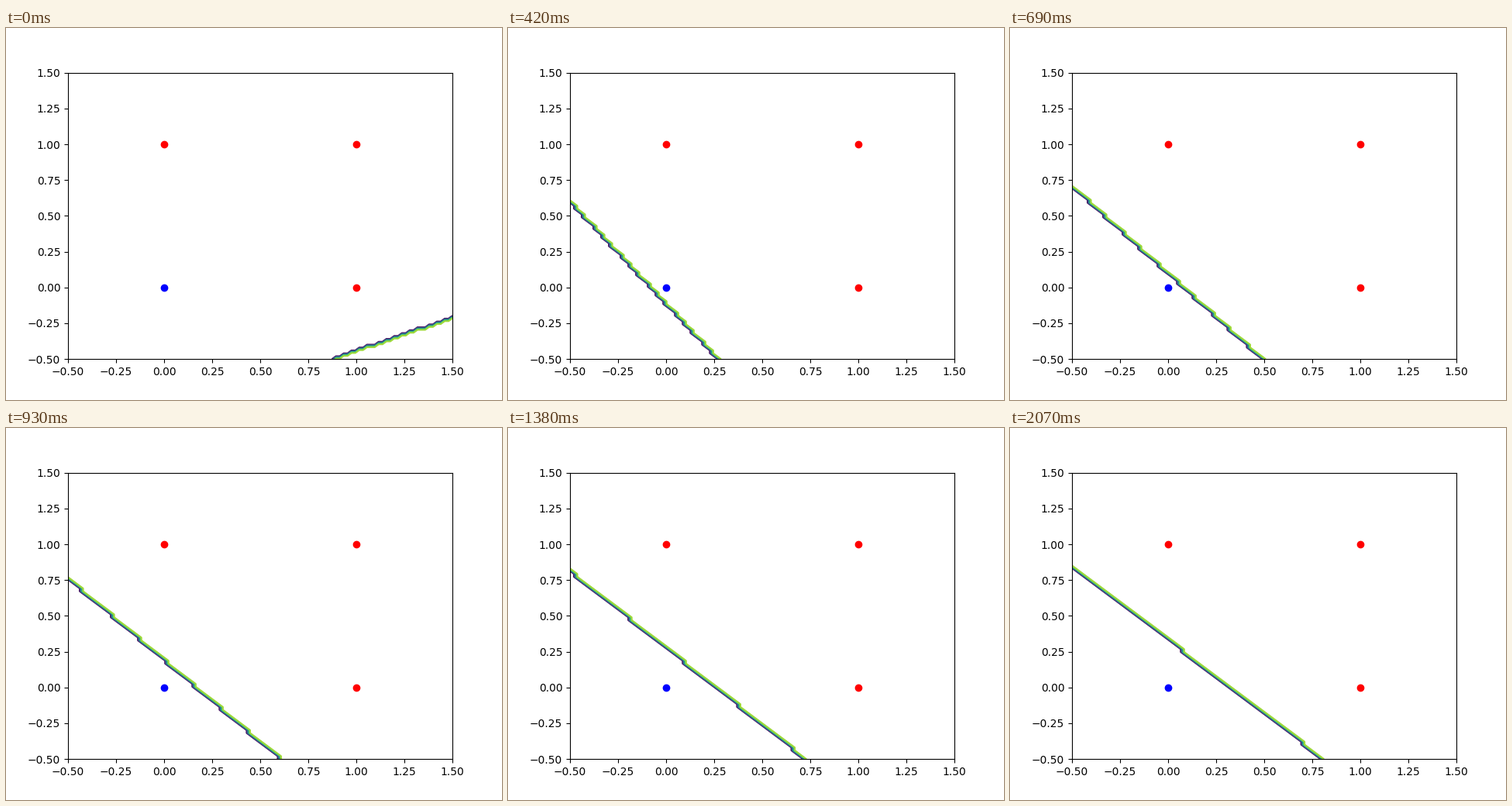
Write a matplotlib script that moves like this. It is 640 px wide and 480 px high and loops after 2100 ms.

```python
import numpy as np
import matplotlib.pyplot as plt
from matplotlib.animation import FuncAnimation

FRAMES = 70
RATE = 1.0

# Logistic regression on the OR table, one gradient step per frame
X = np.array([[0, 0, 1], [0, 1, 1], [1, 0, 1], [1, 1, 1]], float)
T = np.array([0, 1, 1, 1])


def train(w, steps):
    history = [w]
    for _ in range(steps - 1):
        p = 1 / (1 + np.exp(-X @ w))
        w = w + RATE * X.T @ (T - p) / len(T)
        history.append(w)
    return history


weights = train(0.668 * np.array([0.4615, -1.0, -0.9056]), FRAMES)

fig, ax = plt.subplots(figsize=(6.4, 4.8), dpi=100)
ax.set_xlim(-0.5, 1.5)
ax.set_ylim(-0.5, 1.5)
for (x, y, _), t in zip(X, T):
    ax.plot(x, y, "ro" if t else "bo", zorder=3)

axis = np.linspace(-0.5, 1.5, 100)
gx, gy = np.meshgrid(axis, axis)


def clear():
    for c in list(ax.collections):
        c.remove()
    return []


def update(i):
    clear()
    w1, w2, b = weights[i]
    label = (w1 * gx + w2 * gy + b > 0).astype(float)
    ax.contour(gx, gy, label)
    return []


anim = FuncAnimation(fig, update, frames=FRAMES, init_func=clear,
                     interval=30, repeat=True, repeat_delay=0, blit=False)
plt.show()
```
